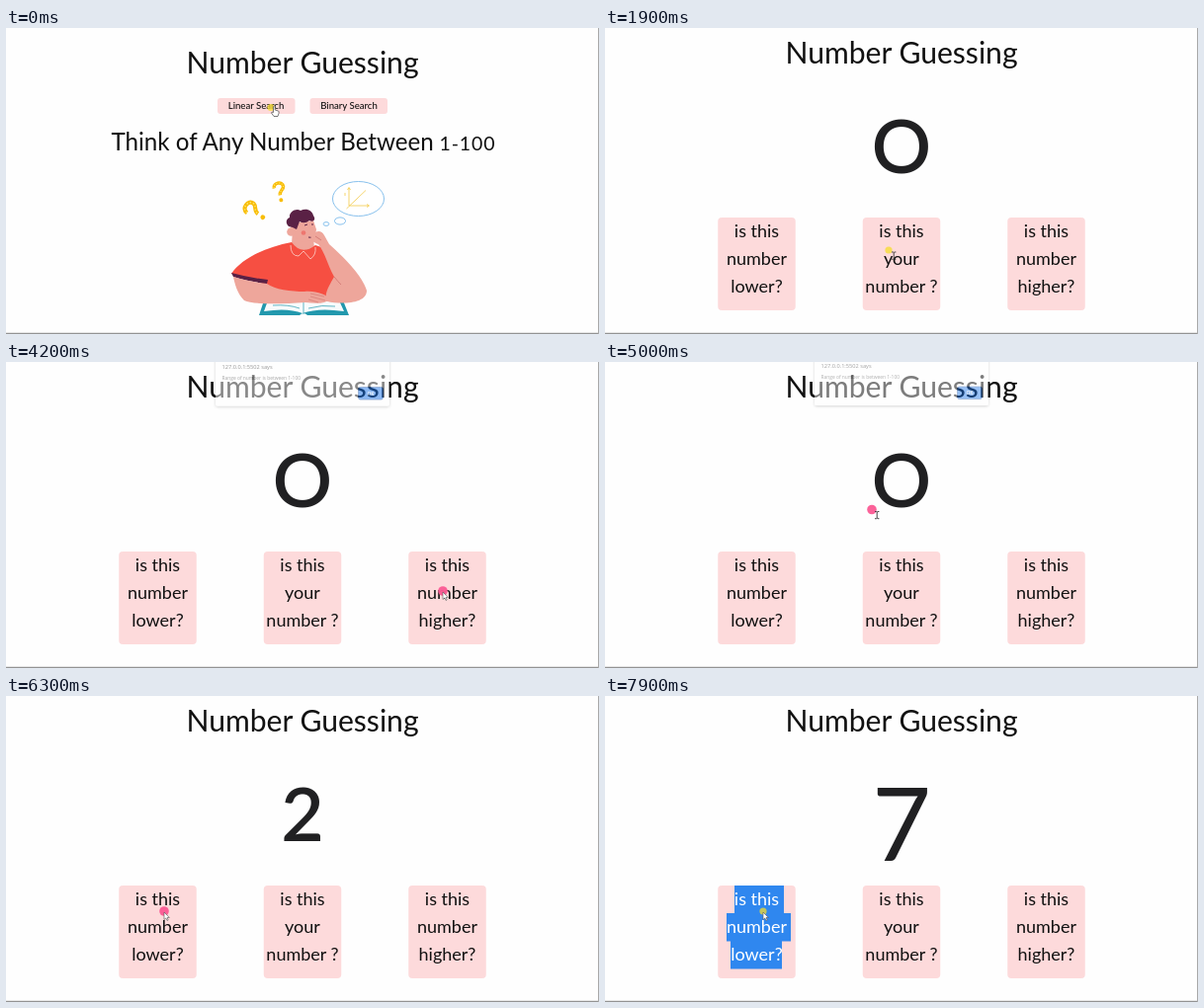
Recreate the animation shown at these times as an HTML page. Size 600 by 310 pixels, loop 8000 ms.

```html
<!DOCTYPE html>
<html lang="en">
<head>
<meta charset="utf-8">
<title>Number Guessing</title>
<style>
  html, body { margin: 0; width: 100%; height: 100%; overflow: hidden; background: #fefefe; }
  svg { display: block; width: 100vw; height: 100vh; }
  text { font-family: Lato, "Open Sans", sans-serif; fill: #111; }
  .mid { text-anchor: middle; }
  .title { font-size: 30.1px; }
  .label { font-size: 9.6px; font-weight: 500; }
  .card { font-size: 18px; }
  .dialog text { font-family: "Open Sans", "Noto Sans", sans-serif; }
  .pink { fill: #fddadb; }
  .skin { fill: #eea69b; }
  .plum { fill: #5a2145; }
</style>
</head>
<body>
<svg viewBox="0 0 600 310" preserveAspectRatio="none">
  <defs>
    <g id="ask" fill="none" stroke="#f8bd08" stroke-width="3.4">
      <path d="M-4.5-4C-5-10 5.5-10 5-4C4.5-.5 0-.5 0 4"/>
      <path d="M-4.5-4C-5-10 5.5-10 5-4C4.5-.5 0-.5 0 4" stroke="#ffe36a" stroke-width="1.2" stroke-dasharray="1.2 1.6"/>
      <circle cy="9" r="2" fill="#f8bd08" stroke="none"/>
    </g>
    <filter id="shade" x="-10%" y="-20%" width="120%" height="150%">
      <feDropShadow dx="0" dy="1" stdDeviation="1.6" flood-opacity=".35"/>
    </filter>
  </defs>
  <rect width="600" height="310" fill="#fefefe"/>
  <text id="title" class="title mid" x="300">Number Guessing</text>

  <g id="intro">
    <rect class="pink" x="214" y="71" width="78.500" height="16" rx="3"/>
    <rect class="pink" x="307.500" y="71" width="78.500" height="16" rx="3"/>
    <text class="label mid" x="253" y="82.300">Linear Search</text>
    <text class="label mid" x="347" y="82.300">Binary Search</text>
    <text x="106.500" y="124" font-size="24.150">Think of Any Number Between</text>
    <text x="438.500" y="124" font-size="19.500" letter-spacing=".9">1-100</text>

    <use href="#ask" transform="translate(276.500 165.500) rotate(-12)"/>
    <use href="#ask" transform="translate(251 185.500) rotate(-55) scale(1.200)"/>
    <g fill="#fff" stroke="#7ab9ea" stroke-width=".9">
      <ellipse cx="356.500" cy="173" rx="26" ry="17.500"/>
      <ellipse cx="338" cy="195.500" rx="5.500" ry="3.600"/>
      <ellipse cx="324" cy="198.500" rx="2.800" ry="1.900"/>
    </g>
    <path d="M347 162V180H367M344.500 183L364 164.500M345.500 164L347 161.500L348.500 164M365 178.500L367.500 180L365 181.500M343 167v3" fill="none" stroke="#f3cb4a" stroke-width=".8"/>

    <path d="M261 276L256 291H297Q301 287 305 291H347L341 276Z" fill="#2298ad"/>
    <path d="M265 276L261 287Q285 283 300 289Q316 283 342 287L337 276Z" fill="#f8fbfc"/>
    <path d="M301 278V290M270 281Q286 280 297 284M306 284Q320 280 333 282" fill="none" stroke="#2298ad" stroke-width=".7"/>
    <path d="M290 203L289 219Q298 231 312 225L311 210Z" class="skin"/>
    <path d="M228 249C238 234 262 222 289 217Q299 231 313 220C328 224 338 236 342 251L330 277H277L263 260Z" fill="#f64f42"/>
    <path d="M228 248Q246 253 265 255L264 259Q245 257 230 252Z" class="plum"/>
    <path d="M230 252Q246 257 264 259C272 265 288 267 302 267C314 266 324 270 328 275C322 280 312 279 303 278C275 280 249 280 241 276C235 270 232 262 230 252Z" class="skin"/>
    <path d="M308 269l14 3M308 272l15 4M306 275l10 3" stroke="#cf746f" stroke-width=".6"/>
    <path d="M288 220Q288 231 296 231L301 226L308 234Q314 230 313 222" fill="none" stroke="#fbc3bb" stroke-width=".9"/>
    <path d="M288 198Q288 211 296 215Q307 219 313 211L314 204L311 195Z" class="skin"/>
    <circle cx="288.500" cy="206.500" r="4.300" class="skin"/>
    <path d="M286 201C282 197 284 193 287 192C286 186 294 182 298 185C304 182 310 185 311 190C314 194 311 197 307 195Q302 199 297 196L294 204L290 202Z" class="plum"/>
    <path d="M302 200l3-1M309 199l2 0M306 212q3 1 5-1" fill="none" stroke="#5a2145"/>
    <circle cx="301" cy="207.500" r="2.300" fill="#ee766f"/>
    <path d="M309 211C313 205 319 204 322 210L327 219C343 233 361 252 365 266C365 280 338 280 325 277C321 270 327 261 332 252C325 239 323 228 316 219C311 217 307 215 309 211Z" class="skin"/>
    <path d="M313 211L319 215M332 252Q336 257 339 260" fill="none" stroke="#cf746f" stroke-width=".8"/>
  </g>

  <g id="game">
    <text id="num" class="mid" x="300"></text>
    <g id="cards"></g>
  </g>

  <g id="dialog" class="dialog">
    <rect x="212" y="-8" width="176" height="57" rx="2" fill="#fff" filter="url(#shade)"/>
    <text x="218.500" y="11" font-size="5.650" style="fill:#333">127.0.0.1:5502 says</text>
    <text x="218.500" y="22" font-size="4.900" style="fill:#555">Range of number is between 1-100</text>
    <rect x="356.500" y="30" width="25" height="12.500" rx="2" fill="#1a73e8" stroke="#2458a8" stroke-width=".8"/>
    <text class="mid" x="369" y="38.200" font-size="5" font-weight="600" style="fill:#fff">OK</text>
  </g>

  <rect y="308.800" width="600" height="1.200" fill="#929292"/>
  <rect x="599" width="1" height="310" fill="#a8a8a8"/>

  <g id="pointer">
    <circle id="dot"/>
    <path id="beam" d="M3 2h1.500l.7.600.7-.600h1.500M5.200 2.600v6M3 9.200h1.500l.7-.600.7.600h1.500" fill="none" stroke="#333" stroke-width=".9"/>
    <path id="arrow" d="M0 1V8.500L1.800 7L3 9.500L4.200 9L3 6.500H5.300Z" fill="#fff" stroke="#555" stroke-width=".6"/>
    <path id="hand" d="M2.500-1q1-1 1.700 0V2.500L7.500 3.500Q8.500 4 8 6L7 9H3L.5 5.500Q.5 4 2.500 5Z" fill="#fff" stroke="#444" stroke-width=".7"/>
  </g>
</svg>
<script>
const LOOP = 8000, STEP = 100;
const $ = id => document.getElementById(id);
const set = (el, attrs) => { for (const k in attrs) el.setAttribute(k, attrs[k]); };
const show = (el, on) => { el.style.display = on ? '' : 'none'; };
const clamp = v => Math.max(0, Math.min(1, v));

function add(parent, name, attrs, text = '') {
  const el = document.createElementNS('http://www.w3.org/2000/svg', name);
  set(el, attrs);
  el.textContent = text;
  parent.append(el);
  return el;
}

const cards = [
  [153.5, ['is this', 'number', 'lower?']],
  [300, ['is this', 'your', 'number ?']],
  [446.5, ['is this', 'number', 'higher?']]
];
const marks = [], lowerLines = [];
cards.forEach(([x, lines], c) => {
  add($('cards'), 'rect', { class: 'pink', x: x - 39.25, y: 192, width: 78.5, height: 94, rx: 4 });
  if (c === 0) [[131, 181], [123, 188], [127, 179]].forEach(([a, b], i) =>
    marks.push(add($('cards'), 'rect', { x: a, y: 192 + 28 * i, width: b - a, height: 28.5, fill: '#2f87ef' })));
  lines.forEach((line, i) => {
    const el = add($('cards'), 'text', { class: 'card mid', x, y: 212 + 28 * i }, line);
    if (c === 0) lowerLines.push(el);
  });
});

// time, x, y of the pointer highlight
const route = [
  [0, 268, 80.500], [200, 268, 80.500], [300, 266, 75.500], [500, 266, 75.500], [1000, 310, 150],
  [1500, 442, 230], [1900, 287, 225], [2300, 300, 232], [2800, 442, 232], [3200, 442, 232],
  [3500, 368, 36], [3700, 368, 36], [4000, 442, 232], [4500, 442, 232], [4800, 366, 36],
  [5000, 270, 149.500], [5500, 160, 218], [8000, 160, 218]
];
const counts = [6000, 6200, 6600, 6900, 7200, 7400, 7600];
const clicks = [200, 2900, 3600, 4200, 4800, ...counts];
const SELECT_AT = 7500;

function pointerAt(t) {
  const i = route.findIndex(p => p[0] > t);
  const a = route[i - 1], b = route[i];
  const u = (t - a[0]) / (b[0] - a[0]);
  const e = u * u * (3 - 2 * u);
  return [a[1] + (b[1] - a[1]) * e, a[2] + (b[2] - a[2]) * e];
}

const dialogLevel = (t, from, to) =>
  clamp(Math.min(t < from ? 0 : .5 + (t - from) / 200, 1 - (t - to) * .0055));

// old-style figures: short, rising or hanging
function drawNumber(n) {
  const short = n < 3, rising = n === 6;
  set($('num'), {
    y: short || rising ? 146.5 : 167,
    'font-size': short ? 75 : 103,
    'font-weight': short ? 600 : 400
  });
  $('num').style.fill = '#202022';
  $('num').textContent = n === 0 ? 'O' : n;
}

function draw(t) {
  const intro = t < 300;
  show($('intro'), intro);
  show($('game'), !intro);
  $('title').setAttribute('y', intro ? 46 : 36);
  drawNumber(counts.filter(c => t >= c).length);

  const selected = t >= SELECT_AT;
  marks.forEach(m => show(m, selected));
  lowerLines.forEach(l => { l.style.fill = selected ? '#fff' : ''; });

  const level = Math.max(dialogLevel(t, 2900, 3600), dialogLevel(t, 4200, 4900));
  set($('dialog'), { opacity: level, transform: `translate(0 ${-9 * (1 - level)})` });
  show($('dialog'), level > 0);

  const [x, y] = pointerAt(t);
  const pressed = !intro && clicks.some(c => t >= c && t < c + 300);
  set($('pointer'), { transform: `translate(${x} ${y})` });
  set($('dot'), {
    r: pressed ? 4.8 : 3.6,
    fill: pressed ? '#fb5a93' : '#f6dc2c',
    opacity: pressed ? .95 : .75
  });
  const arrow = t >= 5400 || level === 1 || (t >= 2800 && t < 4800);
  show($('hand'), intro);
  show($('arrow'), arrow);
  show($('beam'), !intro && !arrow);
}

function tick() {
  const t = performance.now() % LOOP;
  draw(Math.floor(t / STEP) * STEP);
  requestAnimationFrame(tick);
}
tick();
</script>
</body>
</html>
```
